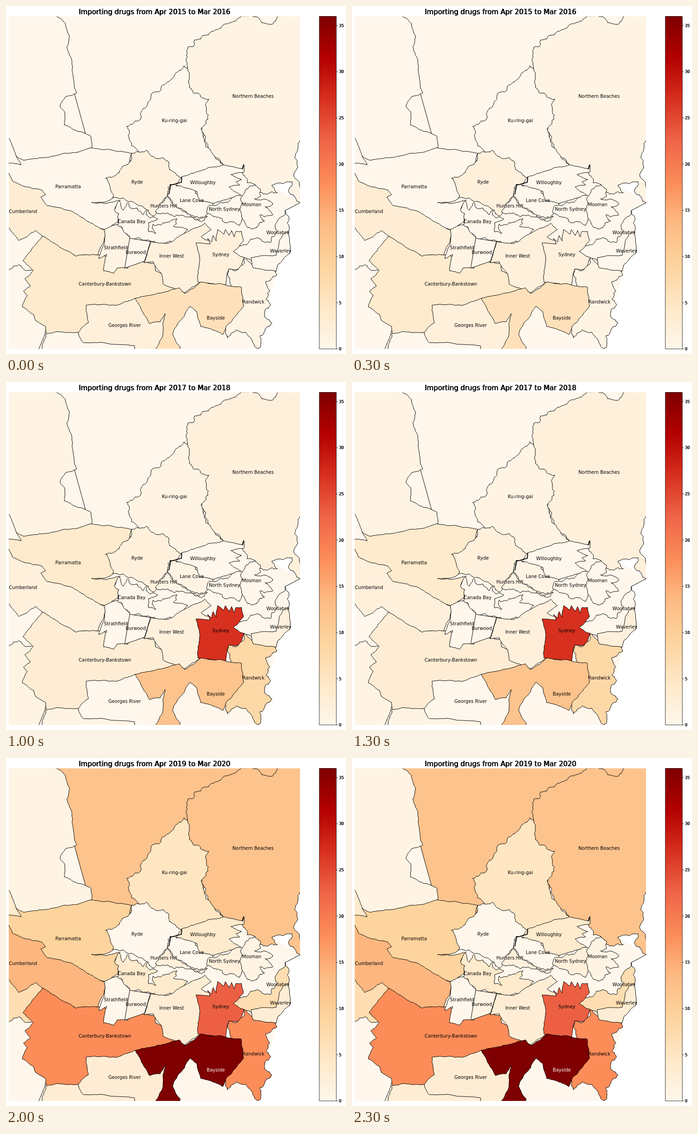
These frames come from a looping animation (739x758 px, 2500 ms). An HTML page with a canvas:

```html
<!DOCTYPE html>
<html lang="en">
<head>
<meta charset="utf-8">
<title>Importing drugs by area</title>
<style>
  html, body { margin: 0; width: 100%; height: 100%; overflow: hidden; background: #fff; }
  canvas { display: block; }
</style>
</head>
<body>
<canvas id="map" width="739" height="758"></canvas>
<script>
const ctx = document.getElementById('map').getContext('2d');
const STEP = 500, MAX = 36, TOP = 22.5, BOTTOM = 747;
const RAMP = ['#fff7ec', '#fee8c8', '#fdd49e', '#fdbb84', '#fc8d59', '#ef6548', '#d7301f', '#b30000', '#7f0000'];
const STRAIGHT = 0, SOFT = .06, ROUGH = .16;

function colour(value) {
  const t = value / MAX * 8, i = Math.min(7, Math.floor(t));
  return `color-mix(in srgb, ${RAMP[i + 1]} ${(t - i) * 100}%, ${RAMP[i]})`;
}

// Splits a side at a displaced midpoint until the pieces are short.
// The shift depends on the place alone, so neighbours share the same border.
function side(path, x, y, u, v, wiggle) {
  const length = Math.hypot(u - x, v - y);
  if (!wiggle || length < 5) return path.lineTo(u, v);
  const size = wiggle * Math.min(length, 30);
  const mx = (x + u) / 2, my = (y + v) / 2, seed = mx * 12.9 + my * 7.3;
  const px = mx + size * Math.sin(seed), py = my + size * Math.cos(seed * 3);
  side(path, x, y, px, py, wiggle);
  side(path, px, py, u, v, wiggle);
}

function outline(text, wiggle, closed = true) {
  const n = text.split(' ').map(Number), path = new Path2D();
  path.moveTo(n[0], n[1]);
  for (let i = 0; i + 3 < n.length; i += 2) side(path, n[i], n[i + 1], n[i + 2], n[i + 3], wiggle);
  if (closed) {
    side(path, ...n.slice(-2), n[0], n[1], wiggle);
    path.closePath();
  }
  return path;
}

const areas = [], labels = [];
const label = (name, x, y) => labels.push({ name, x, y });
// One value per year; later areas cover the hidden sides of earlier ones.
const area = (values, wiggle, border) => areas.push({ values, shape: outline(border, wiggle) });

const water = outline('0 15 600 15 560 380 639 428 606 446 600 540 540 755 0 755', STRAIGHT);
const heads = outline('640 428 606 446', STRAIGHT, false);
const river = outline('382 372 381 384 357 389 354 410', SOFT, false);

area([0, 4, 0, 0, 12], STRAIGHT, '100 15 600 15 400 330 190 340');
area([0, 1, 0, 5, 4], STRAIGHT, '0 275 40 330 40 360 0 360');
area([0, 1, 1, 0, 1], SOFT, '0 15 105 15 109 22 129 38 138 65 132 90 143 117 148 172 154 189 129 198 117 219 128 231 127 259 185 284 186 309 180 330 40 345 22 327 0 280');

area([1, 1, 2, 0, 12], ROUGH, '393 128 395 90 404 89 410 74 487 36 506 26 550 27 556 37 586 33 590 15 650 15 650 290 634 300 628 331 633 345 626 372 638 385 645 428 638 429 614 401 622 383 578 390 590 407 560 410 545 395 524 385 517 345 514 360 472 346 440 320 390 180');
label('Northern Beaches', 537, 197);

area([0, 0, 1, 0, 5], ROUGH, '387 130 393 135 398 160 408 190 441 203 439 247 424 268 448 320 472 346 430 380 345 372 287 315 266 284 262 262 291 248 316 192 353 165 380 140');
label('Ku-ring-gai', 366, 250);

area([0, 2, 4, 3, 9], SOFT, '38 336 108 326 186 309 230 314 273 321 250 400 231 419 215 427 186 428 218 430 246 424 236 443 245 452 243 470 221 488 120 470 0 400 0 343 33 346 22 327');
label('Parramatta', 135, 394);

area([0, 2, 1, 2, 0], STRAIGHT, '0 560 80 560 110 690 86 712 68 755 0 755');
area([0, 0, 1, 0, 3], ROUGH, '90 700 300 690 330 755 66 755 82 733');
area([0, 1, 0, 1, 7], ROUGH, '0 470 90 480 100 560 52 576 40 575 33 566 6 575 0 578');

area([3, 4, 2, 12, 14], SOFT, '0 350 14 381 40 393 78 401 86 411 76 416 90 435 145 448 213 487 216 495 213 513 200 542 152 545 130 536 79 501 65 489 28 511 0 478');
label('Cumberland', 37, 448);

area([2, 0, 0, 0, 3], SOFT, '165 640 300 620 350 660 345 755 279 755 279 740 200 733 168 733 157 713');
label('Georges River', 258, 696);

area([4, 3, 3, 4, 18], SOFT, '79 501 152 545 201 542 240 550 325 560 325 577 350 590 377 614 305 640 279 637 240 652 174 652 179 690 157 711 112 709 88 714 86 698 64 685 60 672 35 655 46 630 38 621 53 610 41 594 59 576 37 555');
label('Canterbury-Bankstown', 215, 606);

area([1, 0, 0, 0, 0], SOFT, '213 487 243 476 280 510 265 571 241 571 234 582 212 577 219 541 202 550 213 520');
label('Strathfield', 239, 527);

area([0, 0, 0, 1, 4], ROUGH, '248 423 255 445 265 428 275 442 285 440 298 455 306 440 305 455 330 464 310 472 310 492 326 495 320 475 372 463 364 480 395 487 352 514 314 512 269 506 243 476 245 452 236 443');
label('Canada Bay', 273, 470);

area([0, 0, 0, 2, 1], STRAIGHT, '269 506 314 513 301 556 258 571');
label('Burwood', 282, 537);

area([2, 4, 2, 1, 3], SOFT, '314 513 352 517 372 504 432 473 446 487 424 503 444 512 424 601 388 625 341 605 338 583 320 557 300 559');
label('Inner West', 360, 545);

area([2, 2, 2, 0, 0], ROUGH, '273 321 306 314 325 332 352 338 382 375 381 384 352 395 351 413 318 457 300 440 262 424 231 419 216 375 246 363 265 345');
label('Ryde', 285, 384);

area([0, 0, 1, 0, 2], ROUGH, '352 415 374 440 410 465 438 458 425 470 377 457 365 459 325 449');
label('Hunters Hill', 343, 436);

area([0, 0, 1, 0, 0], ROUGH, '358 390 404 395 450 430 432 460 390 447 372 440 352 410');
label('Lane Cove', 404, 424);

area([0, 0, 0, 0, 4], SOFT, '382 372 472 346 515 355 517 345 517 362 489 367 512 378 500 383 508 390 485 394 510 412 450 430 421 425 415 404 370 390');
label('Willoughby', 428, 385);

area([0, 0, 0, 0, 2], ROUGH, '439 437 500 413 517 417 512 468 508 478 495 470 485 470 475 472 458 460 436 450');
label('North Sydney', 475, 443);

area([0, 0, 0, 0, 1], ROUGH, '512 460 513 415 530 392 541 390 552 398 553 415 540 420 580 430 563 437 580 455 552 455 562 468 545 483 533 485 520 475');
label('Mosman', 534, 433);

area([0, 0, 0, 0, 7], ROUGH, '494 535 522 520 548 505 575 515 590 490 585 480 607 446 615 490 585 560 518 548');
label('Woollahra', 591, 494);

area([1, 3, 8, 3, 18], ROUGH, '484 573 505 573 518 548 537 565 578 572 588 587 565 600 573 620 565 638 575 650 563 662 578 690 552 718 548 747 533 725 501 705 481 723 470 690 490 640');
label('Randwick', 538, 645);

area([0, 0, 2, 4, 3], SOFT, '533 548 587 543 602 497 615 492 618 537 592 562 587 578 537 570');
label('Waverley', 597, 534);

area([2, 11, 27, 6, 23], SOFT, '413 516 444 518 438 506 447 514 450 500 457 512 460 487 474 497 477 487 485 500 490 489 496 503 500 491 512 491 516 512 494 535 518 548 505 573 484 573 478 608 417 601 421 555');
label('Sydney', 467, 542);

area([6, 10, 12, 12, 36], SOFT, '281 637 346 623 377 614 388 626 424 601 511 612 516 655 478 699 471 716 423 698 414 665 400 654 374 690 362 715 379 743 374 755 323 755 340 720 346 670 335 688 312 692');
label('Bayside', 456, 680);

function write(text, x, y, size, align = 'center', fill = '#000') {
  ctx.font = `${size}px "DejaVu Sans", sans-serif`;
  ctx.textAlign = align;
  ctx.fillStyle = fill;
  ctx.fillText(text, x, y);
}

function writeTwice(text, x, y, size, align) {
  for (const shift of [-.4, .4]) write(text, x + shift, y, size, align);
}

function drawScale() {
  const ramp = ctx.createLinearGradient(0, BOTTOM, 0, TOP);
  RAMP.forEach((stop, i) => ramp.addColorStop(i / 8, stop));
  ctx.fillStyle = ramp;
  ctx.fillRect(681, TOP, 37, BOTTOM - TOP);
  ctx.lineWidth = .8;
  ctx.strokeRect(681, TOP, 37, BOTTOM - TOP);
  for (let v = 0; v < MAX; v += 5) {
    const y = BOTTOM - (BOTTOM - TOP) * v / MAX;
    ctx.beginPath();
    ctx.moveTo(718, y);
    ctx.lineTo(721.5, y);
    ctx.stroke();
    writeTwice(v, 723.6, y + 3.2, 8.33, 'left');
  }
}

function draw() {
  const year = Math.floor(performance.now() / STEP) % 5;
  ctx.fillStyle = '#fff';
  ctx.fillRect(0, 0, 739, 758);
  ctx.strokeStyle = '#000';
  ctx.lineJoin = 'round';

  ctx.save();
  ctx.beginPath();
  ctx.rect(6, TOP, 633, BOTTOM - TOP);
  ctx.clip();
  ctx.fillStyle = RAMP[0];
  ctx.fill(water);
  ctx.lineWidth = 1;
  for (const { values, shape } of areas) {
    ctx.fillStyle = colour(values[year]);
    ctx.fill(shape);
    ctx.stroke(shape);
  }
  ctx.stroke(heads);
  ctx.lineWidth = 1.8;
  ctx.stroke(river);
  ctx.restore();

  for (const { name, x, y } of labels) {
    write(name, x, y + 3.3, 10, 'center', name === 'Bayside' && year === 4 ? '#fff' : '#000');
  }
  writeTwice(`Importing drugs from Apr ${2015 + year} to Mar ${2016 + year}`, 323, 17.6, 15);
  drawScale();
  requestAnimationFrame(draw);
}
draw();
</script>
</body>
</html>
```
